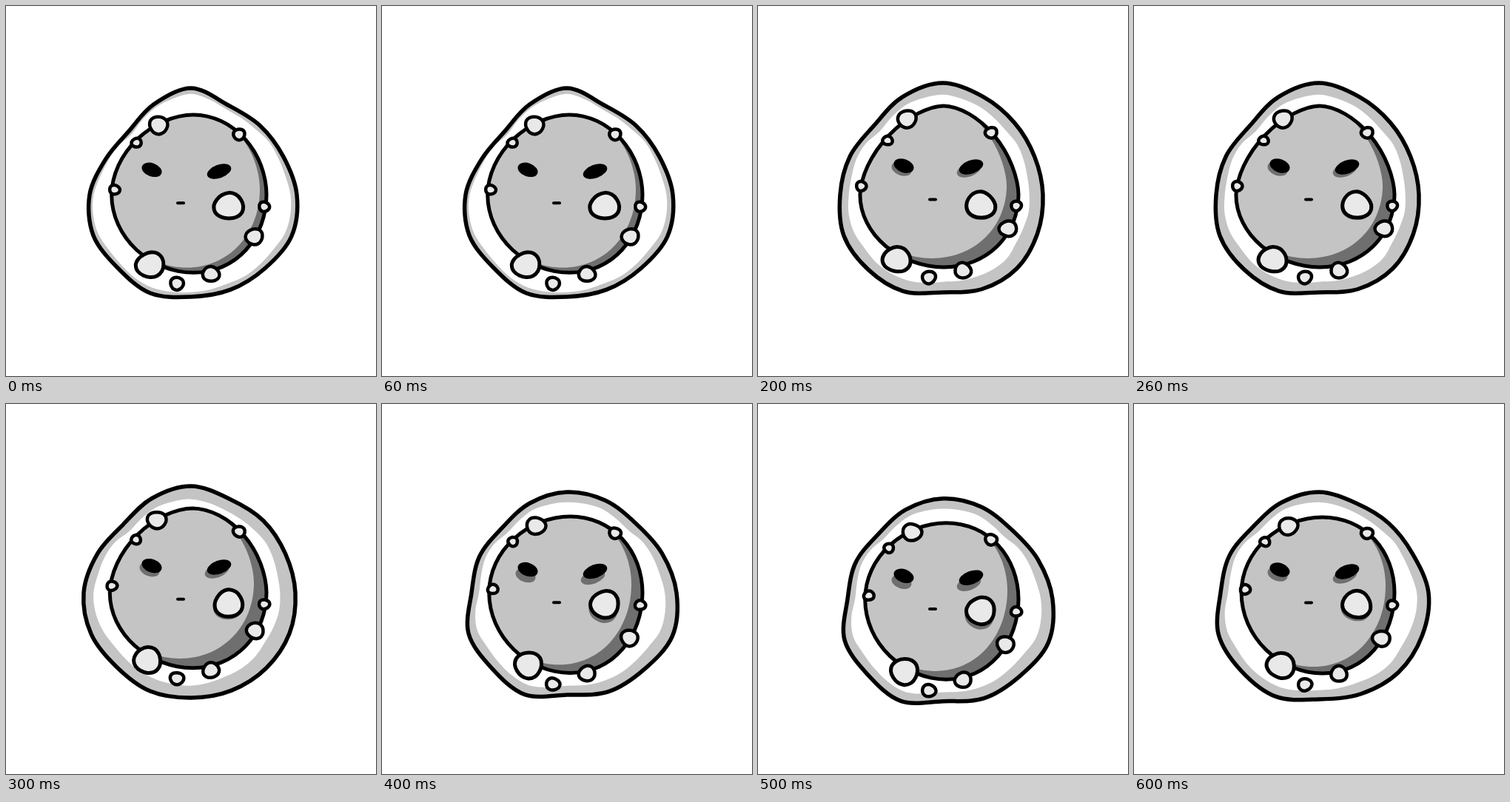
An HTML page with a canvas that plays this animation: 500 by 500 pixels, repeating every 700 ms.

```html
<!DOCTYPE html>
<html lang="en">
<head>
<meta charset="utf-8">
<title>Wobbling moon</title>
<style>
html, body { margin: 0; width: 100%; height: 100%; overflow: hidden; background: #fff; }
canvas { display: block; width: 100vw; height: 100vh; }
</style>
</head>
<body>
<canvas id="stage" width="500" height="500"></canvas>
<script>
const ctx = document.getElementById('stage').getContext('2d');
const HOLD = 100, TAU = Math.PI * 2;
const CX = 250, CY = 255;
const INK = '#000', GREY = '#c4c4c4', SHADE = '#6f6f6f', PALE = '#e9e9e9';

// Each pose: lift of the body, width of the grey band, width of the dusk,
// length of the cast shadows, and the rim's radius at even angles from the right.
const pose = (lift, band, dusk, cast, ...rim) => ({ lift, band, dusk, cast, rim, drop: 0 });
const sway = pose(8, 13, 15, 8,
  148, 154, 147, 145, 138, 149, 144, 144, 129, 128, 124, 131, 136, 135, 132, 139);
const poses = [
  pose(3, 7, 9, 0, 143, 147, 141, 139, 138, 144, 140, 143, 137, 125, 120, 132, 144, 131, 132, 135),
  pose(-2, 13, 11, 5, 140, 141, 139, 139, 138, 142, 143, 145, 138, 131, 123, 134, 144, 133, 136, 134),
  pose(-9, 15, 16, 4, 135, 138, 141, 138, 132, 141, 143, 145, 139, 136, 132, 143, 151, 143, 137, 134),
  pose(-3, 17, 17, 5, 141, 144, 144, 143, 142, 144, 142, 146, 145, 137, 130, 138, 144, 137, 138, 138),
  sway,
  { ...sway, drop: 8.7 },
  pose(9, 13, 12, 6, 148, 151, 152, 148, 144, 152, 149, 147, 133, 131, 126, 132, 136, 131, 133, 137)
];

// Craters: x, y, radius, and how far each follows the lift.
const craters = [
  [205, 159, 12.5, 0.4, 0.7],
  [176, 184, 6.5, 0.1, 0.25],
  [145, 247, 6.8, 0.6, 0.4],
  [315, 173, 7.8, 0, 0.2],
  [301, 270, 19.3, 0, 0.1],
  [349, 271, 7, 0, 0.1],
  [336, 309, 11.5, -0.2, 0.9],
  [277, 361, 11, 0, 0.4],
  [231, 373, 9, 0, 0.7],
  [193, 348, 18.5, 0.6, 0.6]
];
const CHEEK = 4;

// Smooth closed curve through points.
function curve(pts) {
  const n = pts.length, at = i => pts[(i + n) % n];
  const path = new Path2D();
  path.moveTo(...at(0));
  for (let i = 0; i < n; i++) {
    const [a, b, c, d] = [at(i - 1), at(i), at(i + 1), at(i + 2)];
    path.bezierCurveTo(b[0] + (c[0] - a[0]) / 6, b[1] + (c[1] - a[1]) / 6,
      c[0] - (d[0] - b[0]) / 6, c[1] - (d[1] - b[1]) / 6, c[0], c[1]);
  }
  path.closePath();
  return path;
}

// Closed curve through n points given by a function of the angle.
const around = (n, point) =>
  curve(Array.from({ length: n }, (_, i) => point(i * TAU / n, i)));

const polar = (x, y, r, a) => [x + r * Math.cos(a), y + r * Math.sin(a)];

function rimPath({ rim }) {
  return around(rim.length, (a, i) => polar(CX, CY, rim[i], a));
}

// The white ring keeps inside the rim; the grey band is widest at the lower right.
function glowPath({ rim, band }) {
  return around(rim.length * 2, (a, i) => {
    const r = (rim[i >> 1] + rim[((i + 1) >> 1) % rim.length]) / 2;
    const inset = band * (1 + 0.25 * Math.cos(a - 0.5) + 0.1 * Math.sin(3 * a));
    return polar(CX, CY, r - inset + Math.sin(9 * a), a);
  });
}

// An egg: the higher it is lifted, the taller and more pointed its upper half.
function bodyPath({ lift }, shift = 0) {
  const top = 144 + lift, bottom = 358.5 + 0.62 * lift;
  const left = 141.5 + 0.4 * lift, right = 352;
  const rx = (right - left) / 2;
  return around(32, a => {
    const c = Math.cos(a), s = Math.sin(a);
    const power = s < 0 ? 2 / (1.86 + 0.017 * lift) : 1;
    const x = rx * Math.sign(c) * Math.abs(c) ** power + 6 * s * s;
    const y = s < 0 ? (top - CY) * Math.abs(s) ** power : (bottom - CY) * s;
    return [left + rx + x - shift, CY + y - 0.75 * shift];
  });
}

function craterPath(x, y, r, seed) {
  return around(12, a => {
    const k = r * (1 + 0.04 * Math.sin(3 * a + seed) + 0.03 * Math.sin(2 * a + seed * 1.7));
    return [x + k * Math.cos(a), y + 0.92 * k * Math.sin(a)];
  });
}

function fill(path, color) {
  ctx.fillStyle = color;
  ctx.fill(path);
}

function line(path, width) {
  ctx.strokeStyle = INK;
  ctx.lineWidth = width;
  ctx.stroke(path);
}

function within(path, draw) {
  ctx.save();
  ctx.clip(path);
  draw();
  ctx.restore();
}

function eye(x, y, rx, tilt, cast) {
  const oval = (dx, dy, color) => {
    const path = new Path2D();
    path.ellipse(x + dx, y + dy, rx, 9, tilt, 0, TAU);
    fill(path, color);
  };
  if (cast) oval(-3, cast, SHADE);
  oval(0, 0, INK);
}

function drawFace({ lift, cast }) {
  eye(197, 220 + 0.45 * lift, 14, 0.35, cast);
  eye(288, 222 + 0.5 * lift, 17, -0.35, cast);
  const mouth = new Path2D(), y = 265 + 0.4 * lift;
  mouth.moveTo(232, y);
  mouth.lineTo(240, y);
  line(mouth, 4);
}

function drawCraters({ lift, cast }) {
  craters.forEach(([x, y, r, kx, ky], i) => {
    const cx = x + kx * lift, cy = y + ky * lift, seed = i * 2.3 + lift;
    if (i === CHEEK) fill(craterPath(cx - 1, cy + Math.max(0, cast - 2), r + 1, seed), SHADE);
    const path = craterPath(cx, cy, r, seed);
    fill(path, PALE);
    line(path, r > 15 ? 5 : 4.5);
  });
}

function drawMoon(p) {
  const rim = rimPath(p), body = bodyPath(p);
  fill(rim, GREY);
  within(rim, () => fill(glowPath(p), '#fff'));
  line(rim, 5.5);

  fill(body, SHADE);
  within(body, () => fill(bodyPath(p, p.dusk), GREY));
  line(body, 5);

  drawFace(p);
  drawCraters(p);
}

function tick() {
  const p = poses[Math.floor(performance.now() / HOLD) % poses.length];
  ctx.fillStyle = '#fff';
  ctx.fillRect(0, 0, 500, 500);
  ctx.lineJoin = ctx.lineCap = 'round';
  ctx.save();
  ctx.translate(0, p.drop);
  drawMoon(p);
  ctx.restore();
  requestAnimationFrame(tick);
}
tick();
</script>
</body>
</html>
```
